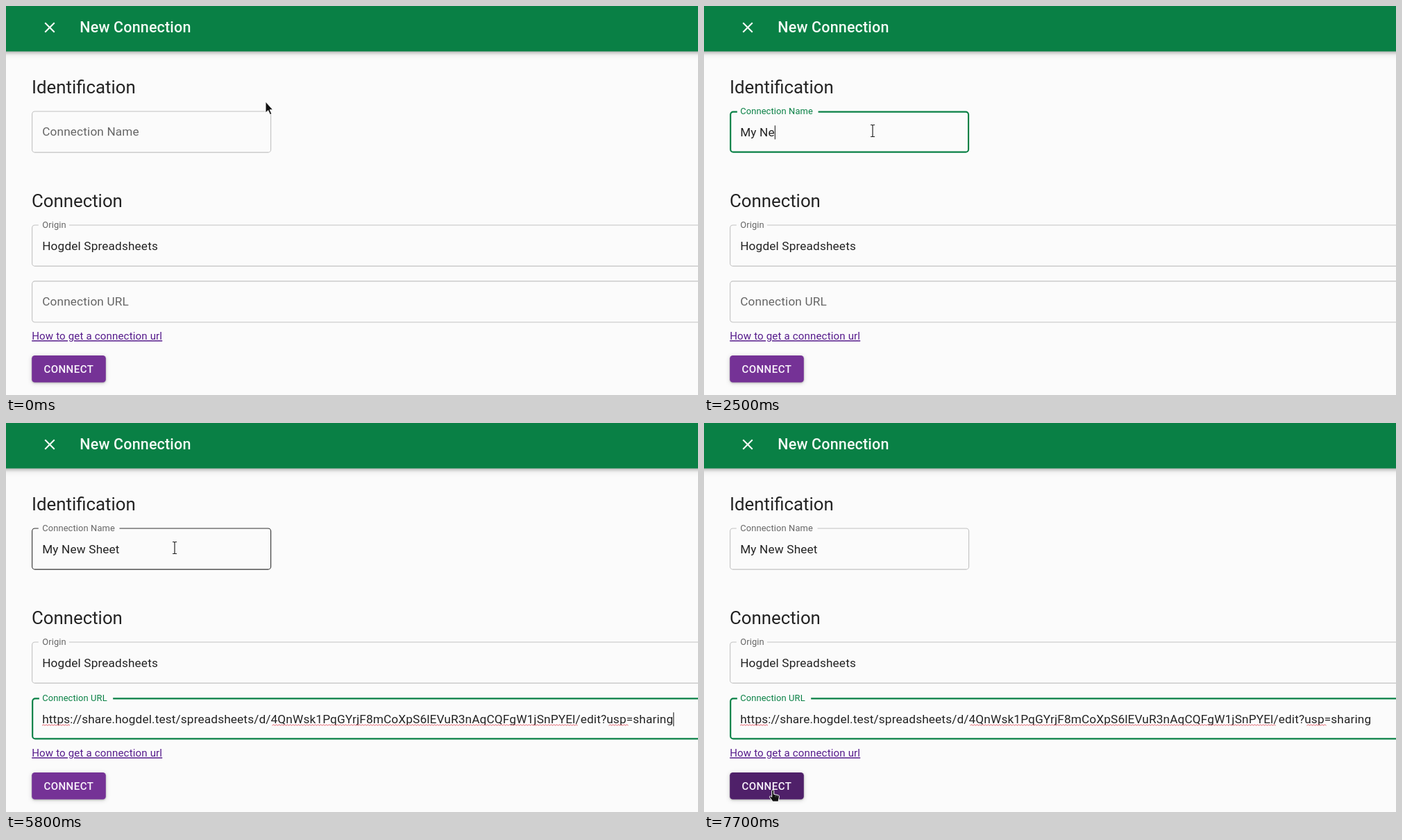
An HTML page for the animation above (8000 ms loop, 997x561 px).

```html
<!DOCTYPE html>
<html lang="en">
<head>
<meta charset="utf-8">
<title>New Connection</title>
<style>
  html, body { margin: 0; width: 100%; height: 100%; overflow: hidden; background: #fbfbfb; }
  svg { display: block; width: 997px; height: 561px; }
  text { font-family: Roboto, "Noto Sans", sans-serif; white-space: pre; fill: #232323; }
  .heading { font-size: 25.8px; }
  .input, .label { font-size: 17.2px; letter-spacing: .00938em; }
  .link { font-size: 15.05px; letter-spacing: .01071em; fill: #551a8b; text-decoration: underline; }
  .title { font-size: 21.5px; font-weight: 500; letter-spacing: .0075em; fill: #f4fbf6; }
  .button { font-size: 15.05px; font-weight: 500; letter-spacing: .02857em; fill: #fbf6fd; }
  .bar { fill: #098045; filter: drop-shadow(0 2px 2px rgba(0,0,0,.2)) drop-shadow(0 2px 5px rgba(0,0,0,.16)); }
  #connect { filter: drop-shadow(0 1px 1px rgba(0,0,0,.22)) drop-shadow(0 1px 3px rgba(0,0,0,.16)); }
  .outline { fill: none; }
  .notch { fill: #fbfbfb; }
  .squiggle { fill: none; stroke: #e4606a; stroke-width: 1; }
  .pointer path { stroke-linejoin: round; }
</style>
</head>
<body>
<svg viewBox="0 0 997 561" xmlns="http://www.w3.org/2000/svg">
  <rect width="997" height="561" fill="#fbfbfb"/>
  <rect class="bar" x="-20" y="-20" width="1037" height="85.5"/>
  <path transform="translate(50.1 18.1) scale(1.075)" fill="#f4fbf6"
    d="M19 6.41L17.59 5 12 10.59 6.41 5 5 6.41 10.59 12 5 17.59 6.41 19 12 13.41 17.59 19 19 17.59 13.41 12z"/>
  <text class="title" x="106.3" y="38.3">New Connection</text>

  <text class="heading" x="37" y="125.8">Identification</text>
  <text class="heading" x="37" y="289.8">Connection</text>
  <g id="fields"></g>

  <text class="input" id="placeholder" x="52.2" y="188.2" fill-opacity="0">My work spreadsheet</text>
  <text class="input" id="name" x="52.2" y="188.2"></text>
  <text class="input" x="52.2" y="352.2">Hogdel Spreadsheets</text>
  <g id="address">
    <text class="input" id="url" x="52.2" y="433.2">https://share.hogdel.test/spreadsheets/d/4QnWsk1PqGYrjF8mCoXpS6lEVuR3nAqCQFgW1jSnPYEl/edit?usp=sharing</text>
    <g id="squiggles"></g>
  </g>
  <rect id="caret" width="1.1" height="20" fill="#222"/>

  <text class="link" x="37.2" y="481.2">How to get a connection url</text>
  <rect id="connect" x="37.2" y="504" width="106.6" height="38.7" rx="4.3"/>
  <text class="button" x="54.4" y="528.5">CONNECT</text>

  <g class="pointer" id="arrow">
    <path d="M0 0V16L3.7 12.6 6.4 18.6 8.8 17.5 6.2 11.7H10.6Z" fill="#111" stroke="#fff" stroke-width=".9"/>
  </g>
  <g class="pointer" id="beam">
    <path d="M-3 -8.5H-1Q0 -8.5 0 -7.5Q0 -8.5 1 -8.5H3M0 -8V8M-3 8.5H-1Q0 8.5 0 7.5Q0 8.5 1 8.5H3"
      fill="none" stroke="#fff" stroke-width="2.8"/>
    <path d="M-3 -8.5H-1Q0 -8.5 0 -7.5Q0 -8.5 1 -8.5H3M0 -8V8M-3 8.5H-1Q0 8.5 0 7.5Q0 8.5 1 8.5H3"
      fill="none" stroke="#222" stroke-width="1.2"/>
  </g>
  <g class="pointer" id="hand">
    <path transform="translate(-4.5 -.5)" fill="#111" stroke="#fff" stroke-width="1"
      d="M3.2 1.6a1.5 1.5 0 0 1 3 0V6.4L12 7.6a2.2 2.2 0 0 1 1.9 2.4L12.6 17H4.6L.3 11a1.2 1.2 0 0 1 1.8-1.6L3.2 10.4Z"/>
    <path d="M4 7V10M6.6 7.6V10" stroke="#999" stroke-width=".6"/>
  </g>
</svg>
<script>
  const LOOP = 8000, STEP = 100;
  const GREEN = [9, 128, 69], GREY = [102, 102, 102], PURPLE = [117, 50, 150], DARK_PURPLE = [79, 32, 105];
  const TEXT_X = 52.2, LEFT = 37.1;
  const el = id => document.getElementById(id);

  const clamp = v => Math.max(0, Math.min(1, v));
  const lerp = (a, b, k) => a + (b - a) * k;
  const ease = v => 1 - Math.pow(1 - clamp(v), 2.64);
  const mix = (a, b, k) => `rgb(${a.map((v, i) => Math.round(lerp(v, b[i], k)))})`;
  const within = (t, [from, to]) => t >= from && t < to;

  function add(parent, tag, attrs, text = '') {
    const node = document.createElementNS('http://www.w3.org/2000/svg', tag);
    set(node, attrs);
    node.textContent = text;
    return parent.appendChild(node);
  }
  function set(node, attrs) {
    for (const key in attrs) node.setAttribute(key, attrs[key]);
  }

  // Outlined inputs: top edge, width, right end of the label gap, focus span, label lift time
  const fields = [
    { label: 'Connection Name', top: 151.5, width: 345, gapEnd: 163.4, focus: [400, 4400], lift: 400 },
    { label: 'Origin', top: 315.5, width: 1000, gapEnd: 90.8, focus: [4400, 4600], lift: -1000 },
    { label: 'Connection URL', top: 396.3, width: 1000, gapEnd: 153, focus: [4600, 9000], lift: 4600 }
  ];
  for (const f of fields) {
    const group = el('fields');
    f.outline = add(group, 'rect', { class: 'outline' });
    f.notch = add(group, 'rect', { class: 'notch', y: f.top - 1, height: 5 });
    f.text = add(group, 'text', { class: 'label' }, f.label);
  }

  for (const [from, to] of [[52, 92], [383.5, 823.5], [868.5, 896.5]]) {
    let d = `M${from} 436.3`;
    for (let x = from + 2, up = true; x <= to; x += 2, up = !up) d += `L${x} ${up ? 434.9 : 436.3}`;
    add(el('squiggles'), 'path', { class: 'squiggle', d });
  }

  const NAME = 'My New Sheet';
  const keyTimes = [1400, 1700, 1900, 2300, 2500, 2700, 2800, 3100, 3200, 3300, 3500, 3800];
  const PASTE = 5800;
  const caretOn = [[400, 1000], [1400, 4400], [4600, 5200], [5700, 6400], [7000, 7500]];

  // Time, x, y of the mouse
  const route = [
    [0, 374, 138], [100, 346, 147], [200, 292, 164], [300, 252, 178], [400, 243, 180],
    [6700, 243, 180], [6800, 246, 204], [6900, 253, 248], [7100, 222, 350],
    [7300, 155, 462], [7500, 105, 522], [7600, 99, 529.5], [LOOP, 99, 529.5]
  ];
  function mouseAt(t) {
    const i = route.findIndex(p => p[0] > t);
    const [a, b] = [route[i - 1], route[i]];
    const k = (t - a[0]) / (b[0] - a[0]);
    return { x: lerp(a[1], b[1], k), y: lerp(a[2], b[2], k) };
  }
  const inside = (m, x, y, w, h) => m.x >= x && m.x <= x + w && m.y >= y && m.y <= y + h;

  function drawField(f, t, mouse) {
    const focused = within(t, f.focus);
    const hovered = inside(mouse, LEFT, f.top, f.width, 60.2);
    const line = focused ? 2.15 : 1.08;
    const lift = ease((t - f.lift) / 200);
    const tint = ease((t - f.focus[0]) / 200) - ease((t - f.focus[1]) / 200);
    set(f.outline, {
      x: LEFT + line / 2, y: f.top + line / 2, width: f.width - line, height: 60.2 - line, rx: 4,
      'stroke-width': line,
      stroke: focused ? mix(GREEN, GREEN, 0) : hovered ? '#303030' : '#c2c2c2'
    });
    const gapStart = LEFT + 8.6 + line;
    set(f.notch, { x: gapStart, width: lift > 0 ? f.gapEnd + line - 1 - gapStart : 0 });
    const y = f.top + lerp(35.8, 4.6, lift);
    f.text.setAttribute('transform', `translate(${TEXT_X} ${y}) scale(${lerp(1, .75, lift)})`);
    f.text.style.fill = mix(GREY, GREEN, tint);
  }

  function drawMouse(mouse) {
    const overInput = inside(mouse, LEFT, 151.5, 345, 60.2) || inside(mouse, LEFT, 396.3, 1000, 60.2);
    const overLink = inside(mouse, LEFT, 315.5, 1000, 60.2) || inside(mouse, LEFT, 467, 188, 18) ||
      inside(mouse, LEFT, 504, 107, 39);
    const shape = overInput ? 'beam' : overLink ? 'hand' : 'arrow';
    for (const id of ['arrow', 'beam', 'hand']) {
      set(el(id), { transform: `translate(${mouse.x} ${mouse.y})`, visibility: id === shape ? 'visible' : 'hidden' });
    }
  }

  function draw(t) {
    const mouse = mouseAt(t);
    fields.forEach(f => drawField(f, t, mouse));

    const typed = keyTimes.filter(k => k <= t).length;
    el('name').textContent = NAME.slice(0, typed);
    el('placeholder').setAttribute('fill-opacity', typed ? 0 : .42 * ease((t - 400) / 200));
    el('address').setAttribute('visibility', t >= PASTE ? 'visible' : 'hidden');

    const inUrl = t >= 4600;
    const length = inUrl ? (t >= PASTE ? el('url').getComputedTextLength() : 0)
      : typed ? el('name').getComputedTextLength() : 0;
    set(el('caret'), {
      x: TEXT_X + length, y: inUrl ? 417.3 : 172.3,
      visibility: caretOn.some(span => within(t, span)) ? 'visible' : 'hidden'
    });

    el('connect').setAttribute('fill', mix(PURPLE, DARK_PURPLE, ease((t - 7450) / 250)));
    drawMouse(mouse);
  }

  function tick() {
    const t = performance.now() % LOOP;
    draw(Math.floor(t / STEP) * STEP);
    requestAnimationFrame(tick);
  }
  tick();
</script>
</body>
</html>
```
